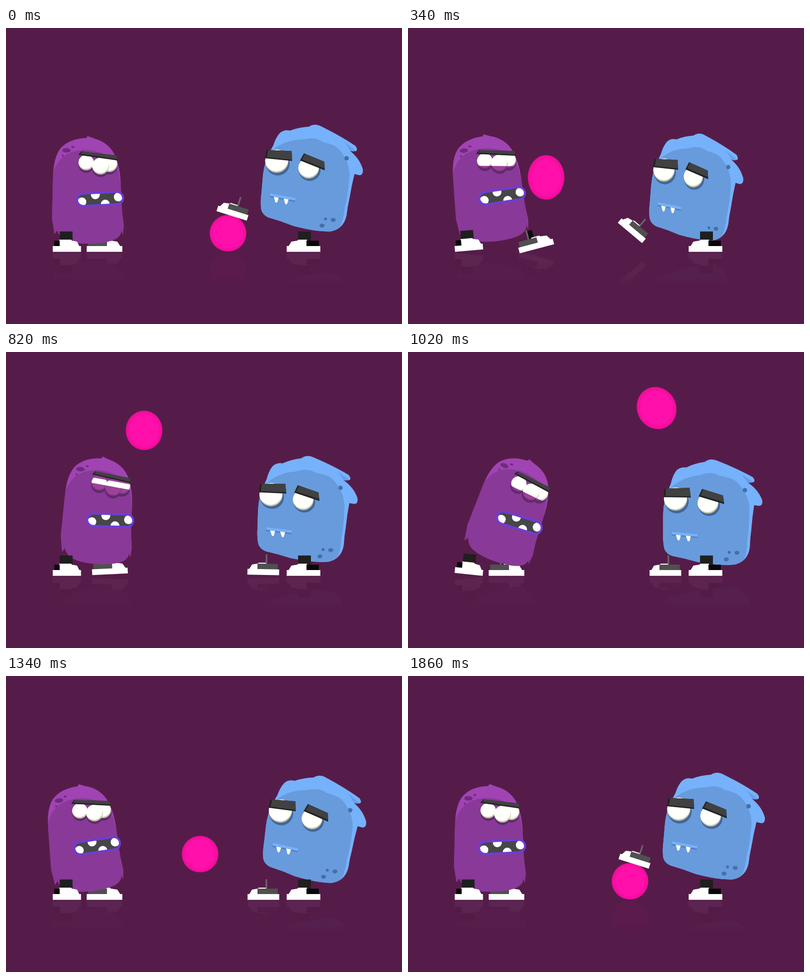
These frames come from a looping animation (800 px wide and 600 px high, 1880 ms). An HTML page with a canvas:

```html
<!DOCTYPE html>
<html lang="en">
<head>
<meta charset="utf-8">
<title>Monster kick-about</title>
<style>
html, body { margin: 0; width: 100%; height: 100%; overflow: hidden; background: #561c49; }
canvas { display: block; }
</style>
</head>
<body>
<canvas id="stage" width="800" height="600"></canvas>
<script>
const W = 800, H = 600, LOOP = 1880, STEP = 20, FLOOR = 455, GROUND = 416, R = 37;
const out = document.getElementById('stage').getContext('2d');
const layer = () => Object.assign(document.createElement('canvas'), { width: W, height: H }).getContext('2d');
const c = layer(), mirror = layer();

// ---- timing helpers -----------------------------------------------------

const lerp = (a, b, u) => a + (b - a) * u;
const part = (t, from, to) => Math.min(1, Math.max(0, (t - from) / (to - from)));
const smooth = u => u * u * (3 - 2 * u);
const ease = (t, from, to) => smooth(part(t, from, to));
const bump = (t, from, to) => Math.sin(Math.PI * part(t, from, to));
const arc = (t, from, to, height) => { const u = part(t, from, to); return 4 * height * u * (1 - u); };
const settle = (u, power) => 1 - (1 - u) ** power;

// Eases through a cue list of [time, pose].
function cue(t, cues) {
  const i = cues.findIndex(([at]) => at >= t);
  if (i < 0) return cues[cues.length - 1][1];
  if (i === 0) return cues[0][1];
  const [from, a] = cues[i - 1], [to, b] = cues[i];
  return a.map((v, k) => lerp(v, b[k], ease(t, from, to)));
}

// ---- ball ---------------------------------------------------------------

const KICK = 185, LIFT = 265, TOP = 640, HEAD = 840, FACE = 1085, LAND = 1211, DRAG = 1690, STOP = 1840;
const restX = 448.5, liftX = 279, farX = 387, dragX = 406;

function ballAt(t) {
  if (t < LIFT) return { x: lerp(restX, liftX, part(t, KICK, LIFT)), y: GROUND };
  if (t < TOP) {
    const u = part(t, LIFT, TOP);
    return { x: liftX, y: lerp(GROUND, 39, settle(u, 1.6)), sy: 1.3 - .4 * u };
  }
  if (t < HEAD) {
    const u = part(t, TOP, HEAD);
    return { x: liftX, y: lerp(39, 187, u * u), sy: .9 + .2 * u };
  }
  if (t < FACE) {
    const u = part(t, HEAD, FACE);
    return { x: lerp(liftX, 528, settle(u, 1.71)), y: lerp(187, 206, u) - arc(t, HEAD, FACE, 112),
      sx: 1.07, sy: 1.1 + .1 * u, turn: -33 * u };
  }
  if (t < LAND) {
    const u = part(t, FACE, LAND);
    return { x: lerp(528, farX, u), y: lerp(206, GROUND, u ** 1.3) };
  }
  return {
    x: lerp(farX, dragX, part(t, LAND, DRAG)) + (restX - dragX) * ease(t, DRAG, STOP),
    y: GROUND - arc(t, LAND, 1469, 55) - arc(t, 1469, 1640, 24.5)
  };
}

// ---- poses: x, y, turn, width -------------------------------------------

const purpleRest = [190, 346.5, 0], purpleBack = [191, 334, -14];
const purpleBody = t => cue(t, [
  [100, purpleRest], [340, [190, 340, -5.5]], [560, purpleBack], [740, purpleBack],
  [900, [230, 348, 23]], [1020, [225, 346, 20]], [1320, [184, 344, -5.5]], [1660, purpleRest]
]);

const purpleNear = t => {
  const rock = 6 * bump(t, 860, 1180) - 5 * bump(t, 190, 490);
  return [123, 448 - Math.abs(rock) / 2, rock];
};

const purpleFar = t => {
  const up = ease(t, 190, LIFT + 20) - ease(t, 740, 850);
  return [199 + 60 * up, 448 - up * (6 + 11 * part(t, 340, TOP)), -15 * up];
};

const blueRest = [559, 343, 0, 1];
const blueBody = t => cue(t, [
  [20, blueRest], [320, [528, 361, 0, .92]], [640, [546, 355, -2, 1]], [1040, [559, 370, -5, 1]],
  [1180, [582, 351, 5, 1]], [1340, [564, 347, 1.8, 1]], [1540, [555, 349, -2.8, 1]], [1800, blueRest]
]);

const onBall = [restX + 9, 375.5, 17.5], planted = [520, 448, 0];
const blueFar = t => cue(t, [
  [0, onBall], [120, [525, 426, 8]], [280, [447, 406, 42]], [340, [452, 411, 40]],
  [640, [517, 426, 12.5]], [860, planted], [1420, planted], [1540, [518, 424, 20]],
  [DRAG, [dragX + 9, 375.5, 17.5]], [STOP, onBall]
]);

// Eye opening of the purple monster while it follows the high ball.
function lids(t) {
  const squint = bump(t, 150, 1200);
  return [7 * part(squint, .7, 1), 40 - 26 * squint ** .7];
}

// ---- drawing helpers ----------------------------------------------------

function path(d, fill) {
  c.fillStyle = fill;
  c.fill(new Path2D(d));
}

function box(x, y, w, h, fill) {
  c.fillStyle = fill;
  c.fillRect(x, y, w, h);
}

function disc(x, y, rx, ry = rx) {
  const p = new Path2D();
  p.ellipse(x, y, rx, ry, 0, 0, 7);
  return p;
}

function oval(x, y, rx, fill, ry = rx) {
  c.fillStyle = fill;
  c.fill(disc(x, y, rx, ry));
}

function clipped(shape, draw) {
  c.save();
  c.clip(shape);
  draw();
  c.restore();
}

// Draws in coordinates around (ox, oy), moved to the given pose.
function posed([x, y, turn, sx = 1], ox, oy, draw) {
  c.save();
  c.translate(x, y);
  c.rotate(turn * Math.PI / 180);
  c.scale(sx, 1);
  c.translate(-ox, -oy);
  draw();
  c.restore();
}

function eyeball(x, y, r) {
  oval(x, y, r, '#c6c4ae');
  clipped(disc(x, y, r), () => oval(x - .5, y - 3, r, '#fffffb'));
}

// Slanted brow with a dark left side and lower edge.
function brow(x1, y1, x2, y2, drop, lean) {
  const shape = new Path2D(`M${x1} ${y1}L${x2} ${y2}L${x2 + 1} ${y2 + drop}L${x1 - lean} ${y1 + drop - 3}Z`);
  c.fillStyle = '#222';
  c.fill(shape);
  clipped(shape, () => {
    c.translate(4, -2);
    c.fillStyle = '#414141';
    c.fill(shape);
  });
}

// Shoe seen from the side; dir is where the toe points, near shoes have a solid leg.
function shoe({ x, w, dir, heel, near, leg }) {
  c.save();
  c.translate(x - dir * w / 2, 0);
  c.scale(dir, 1);
  if (near) box(leg, 412.5, 26, 18, '#1f1f1f');
  else box(leg, 412, 3, 20, '#6a6a6a');
  const start = Math.min(heel - 1, .42 * w);
  path(`M${start} 443V429H${.65 * w}L${.68 * w} 431L${.86 * w} 433L${.95 * w} 443Z`, '#fff');
  box(3, 431, heel - 3, 12, near ? '#080808' : '#505050');
  box(0, 442, w, 11.7, '#fff');
  c.restore();
}

const shoes = {
  purpleNear: { x: 123.5, w: 57, dir: 1, heel: 14, near: true, leg: 14 },
  purpleFar: { x: 199, w: 72, dir: 1, heel: 41, leg: 23 },
  blueFar: { x: 520, w: 64, dir: -1, heel: 44, leg: 24.5 },
  blueNear: { x: 601, w: 68, dir: -1, heel: 28, near: true, leg: 19 }
};

function foot(name, pose) {
  posed(pose, shoes[name].x, 448, () => shoe(shoes[name]));
}

// ---- monsters -----------------------------------------------------------

const purpleShape = new Path2D('M98 418Q96 404 93 386L95 300Q96 262 110 244Q128 224 162 223L165 219L178 224' +
  'Q205 231 218 254Q231 280 232 320L233 350Q234 375 238 400L236 419L233 410Q233 424 214 431' +
  'Q195 437 165 437Q135 437 117 428Q108 423 103 410Z');

function drawPurple([top, bottom]) {
  c.fillStyle = '#a043b3';
  c.fill(purpleShape);
  clipped(purpleShape, () =>
    path('M90 312Q99 268 125 255Q147 245 172 248Q214 254 227 290L234 330L242 440H90Z', '#893997'));
  oval(122, 248, 8.5, '#6f2b80', 4.5);
  oval(135, 241, 3, '#6f2b80', 2);
  oval(115, 259, 2, '#6f2b80');

  const eyes = [[162, 273, 15.5], [209, 276, 16], [191, 280, 17]];
  eyes.forEach(([x, y, r]) => oval(x, y + 5, r, '#602a6b'));
  eyes.forEach(([x, y, r]) => {
    oval(x, y, r, '#7b3283');
    oval(x, y - 1, r - 1, '#9c4298');
  });
  const slit = new Path2D(), tilt = new DOMMatrix().translate(186, 262).rotate(6);
  const open = new Path2D();
  open.rect(-60, top, 120, bottom - top);
  slit.addPath(open, tilt);
  clipped(slit, () => eyes.forEach(e => eyeball(...e)));
  brow(152, 250, 224, 258.5, 10, 6);

  posed([190, 346.5, -3], 0, 0, () => {
    const lips = new Path2D();
    lips.roundRect(-46.5, -12.5, 93, 25, 12.5);
    c.fillStyle = '#474747';
    c.fill(lips);
    clipped(lips, () => [-37, -9, 10, 37].forEach((x, i) => oval(x, [4, -9, 11, -2][i], 9, '#fff')));
    c.strokeStyle = '#6b3ddd';
    c.lineWidth = 4;
    c.stroke(lips);
  });
}

const blueShape = new Path2D('M519 300Q522 268 540 238Q545 222 553 213Q562 205 574 208Q592 201 612 200' +
  'Q624 192 638 200Q650 206 665 214Q690 228 706 239Q711 246 708 249Q702 251 695 249Q715 265 721 287' +
  'Q722 300 712 298L704 296Q698 320 694 345Q690 362 688 380Q682 408 655 412.5Q625 413 580 401' +
  'Q555 391 530 384Q515 377 515 362Q514 350 516 335Z');

function drawBlue() {
  c.fillStyle = '#76b1fb';
  c.fill(blueShape);
  clipped(blueShape, () =>
    path('M508 302Q522 262 545 242Q570 226 600 226Q624 219 640 231Q664 236 673 246' +
      'Q694 270 694 300Q690 345 684 365Q682 395 668 414L640 422H508Z', '#689bdc'));
  path('M684 231L707 249.5L695 249Z', '#679fe6');
  oval(688, 264, 4.5, '#456fa7');
  oval(645.5, 387, 3, '#456fa7');
  oval(661, 389, 5, '#456fa7', 4);
  oval(638.5, 400.5, 5, '#456fa7', 4);

  oval(549, 275, 24, '#426798');
  eyeball(547, 270, 23.5);
  oval(613.5, 288, 22, '#426798');
  eyeball(611.5, 284, 21);
  brow(526, 247, 577, 249.5, 20, 3);
  brow(602, 254, 643, 271, 17.5, 8);

  posed([559, 343, 10.5], 0, 0, () => {
    box(-26, 0, 52, 5, '#5282c0');
    box(-26, -3, 52, 5, '#76b1fb');
  });
  for (const [x, y] of [[546, 343], [566, 346.5]])
    path(`M${x - 5} ${y - 1}L${x + 5} ${y + 1}L${x + 2} ${y + 10}Q${x} ${y + 12} ${x - 2} ${y + 10}Z`, '#fffdf0');
}

function drawBall({ x, y, sx = 1, sy = 1, turn = 0 }) {
  c.save();
  c.translate(x, y);
  c.rotate(turn * Math.PI / 180);
  c.scale(sx, sy);
  const g = c.createRadialGradient(0, 0, 0, 0, 0, R);
  g.addColorStop(.75, '#ff10aa');
  g.addColorStop(1, '#ec0c9a');
  oval(0, 0, R, g);
  c.restore();
}

// ---- scene --------------------------------------------------------------

function scene(t) {
  c.clearRect(0, 0, W, H);
  posed(purpleFar(t), 199, 448, () => box(189, 414, 10, 17, '#0c0c0c'));
  foot('purpleFar', purpleFar(t));
  posed(purpleBody(t), 190, 346.5, () => drawPurple(lids(t)));
  foot('purpleNear', purpleNear(t));
  drawBall(ballAt(t));
  foot('blueFar', blueFar(t));
  posed(blueBody(t), 559, 343, drawBlue);
  foot('blueNear', [601, 448, 0]);
}

const fade = mirror.createLinearGradient(0, FLOOR, 0, 523);
fade.addColorStop(0, 'rgba(0,0,0,.04)');
fade.addColorStop(.65, 'rgba(0,0,0,.035)');
fade.addColorStop(1, 'rgba(0,0,0,0)');

function reflect() {
  mirror.globalCompositeOperation = 'copy';
  mirror.setTransform(1, 0, 0, -1, 0, 2 * FLOOR);
  mirror.drawImage(c.canvas, 0, 0);
  mirror.setTransform(1, 0, 0, 1, 0, 0);
  mirror.globalCompositeOperation = 'destination-in';
  mirror.fillStyle = fade;
  mirror.fillRect(0, 0, W, H);
}

function frame() {
  const t = Math.floor(performance.now() % LOOP / STEP) * STEP;
  scene(t);
  reflect();
  out.fillStyle = '#561c49';
  out.fillRect(0, 0, W, H);
  out.drawImage(mirror.canvas, 0, FLOOR, W, H - FLOOR, 0, FLOOR, W, H - FLOOR);
  out.drawImage(c.canvas, 0, 0);
  requestAnimationFrame(frame);
}
frame();
</script>
</body>
</html>
```
